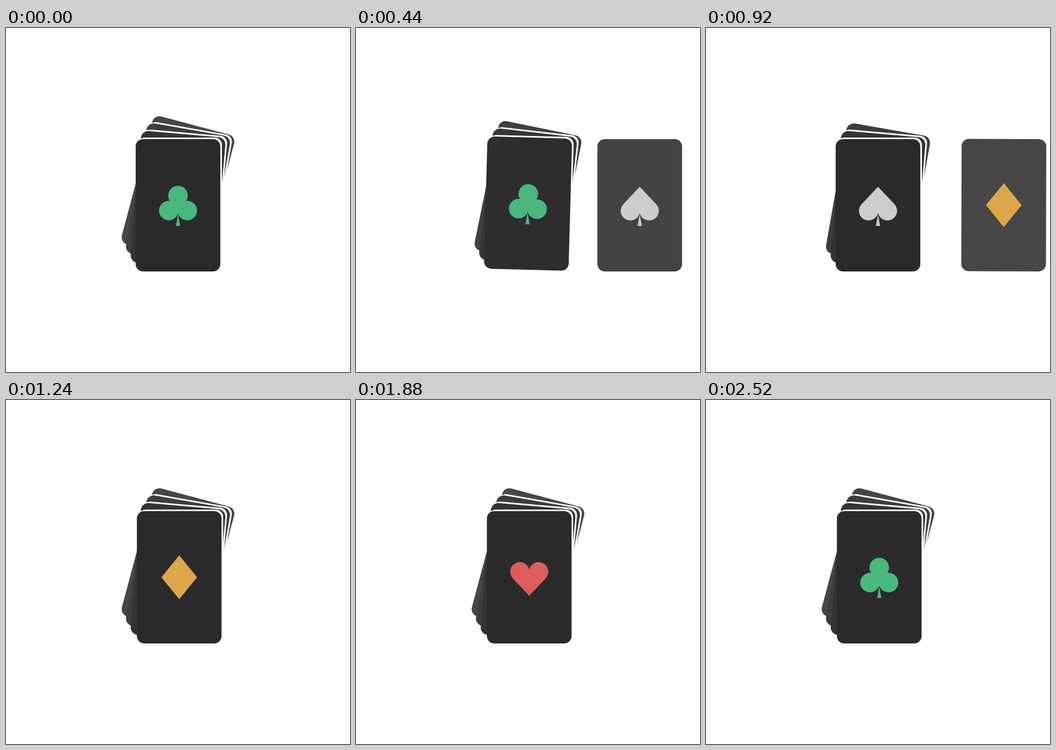
Write an HTML page with a canvas that moves like this. It is 650 px wide and 650 px high and loops after 2560 ms.

```html
<!DOCTYPE html>
<html lang="en">
<head>
<meta charset="utf-8">
<title>Card shuffle</title>
<style>
  html, body { margin: 0; width: 100%; height: 100%; overflow: hidden; background: #fff; }
  canvas { display: block; }
</style>
</head>
<body>
<canvas id="stage" width="650" height="650"></canvas>
<script>
const ctx = document.getElementById('stage').getContext('2d');

const CENTER = { x: 325, y: 335 };
const CARD = { w: 160, h: 250, r: 14 };
const STEP = 640;      // one card moves from back to front
const FRAME = 40;
const REACH = 240;
const COUNT = 4;

const lerp = (a, b, p) => a + (b - a) * p;
const clamp = v => Math.min(1, Math.max(0, v));
const easeInOutCubic = p => p < 0.5 ? 4 * p ** 3 : 1 - 4 * (1 - p) ** 3;

// CSS-style timing curve with handles (x1, 0) and (x2, 1)
function bezierEase(x1, x2) {
  return p => {
    let lo = 0, hi = 1, s = 0.5;
    for (let i = 0; i < 30; i++) {
      s = (lo + hi) / 2;
      const x = 3 * (1 - s) ** 2 * s * x1 + 3 * (1 - s) * s * s * x2 + s ** 3;
      if (x < p) lo = s; else hi = s;
    }
    return 3 * s * s - 2 * s ** 3;
  };
}
const slide = bezierEase(0.86, 0.2);

function circle(x, y, r) {
  ctx.beginPath();
  ctx.arc(x, y, r, 0, Math.PI * 2);
  ctx.fill();
}

function polygon(...points) {
  ctx.beginPath();
  points.forEach(([x, y]) => ctx.lineTo(x, y));
  ctx.closePath();
  ctx.fill();
}

const stem = () => polygon([0, 17], [4, 39], [-4, 39]);

function heartShape() {
  circle(-17.8, -10.5, 18.2);
  circle(17.8, -10.5, 18.2);
  polygon([0, 35], [-30.9, 2.2], [-17.8, -10.5], [0, -14.3], [17.8, -10.5], [30.9, 2.2]);
}

const suits = {
  club: { color: '#48b87e', draw() {
    circle(0, -18.3, 18.5);
    circle(-17.5, 10, 18.5);
    circle(17.5, 10, 18.5);
    polygon([0, -18], [-17, 10], [17, 10]);
    stem();
  } },
  heart: { color: '#de5c5c', draw: heartShape },
  diamond: { color: '#dea64b', draw() {
    polygon([0, -41.5], [33.7, 0], [0, 41.5], [-33.7, 0]);
  } },
  spade: { color: '#cdcdcd', draw() {
    ctx.save();
    ctx.scale(1, -1);
    heartShape();
    ctx.restore();
    stem();
  } },
};
const order = ['club', 'heart', 'diamond', 'spade'];   // front to back

function roundedCard(dx, dy, fill) {
  ctx.fillStyle = fill;
  ctx.beginPath();
  ctx.roundRect(dx - CARD.w / 2, dy - CARD.h / 2, CARD.w, CARD.h, CARD.r);
  ctx.fill();
}

// depth sets tilt and height, shade sets the grey; both run from 0 (front) to 3 (back)
function drawCard(name, depth, shade, offset = 0) {
  const grey = Math.round(lerp(42, 70, shade / 3));
  ctx.save();
  ctx.translate(CENTER.x + offset, CENTER.y - 10 * depth);
  ctx.rotate(depth * 5 * Math.PI / 180);
  roundedCard(3, -3, '#fff');
  roundedCard(0, 0, `rgb(${grey},${grey},${grey})`);
  ctx.fillStyle = suits[name].color;
  suits[name].draw();
  ctx.restore();
}

function render(time) {
  const t = Math.floor(time / FRAME) * FRAME % (STEP * COUNT);
  const turn = Math.floor(t / STEP);
  const phase = t % STEP;
  const half = STEP / 2;
  const suitAt = depth => order[(depth - turn + COUNT) % COUNT];
  const leaving = phase < half;

  ctx.fillStyle = '#fff';
  ctx.fillRect(0, 0, 650, 650);

  const moving = suitAt(COUNT - 1);
  if (leaving) {
    const p = slide(phase / half);
    drawCard(moving, lerp(3, 0, p), 3, REACH * p);
  }

  const shift = easeInOutCubic(clamp((phase - half) / 280));
  for (let i = COUNT - 2; i >= 0; i--) {
    drawCard(suitAt(i), i + shift, i + shift);
  }

  if (!leaving) {
    const p = slide((phase - half) / half);
    drawCard(moving, 0, lerp(3, 0, p), REACH * (1 - p));
  }
}

const start = performance.now();
function tick() {
  render(performance.now() - start);
  requestAnimationFrame(tick);
}
tick();
</script>
</body>
</html>
```
